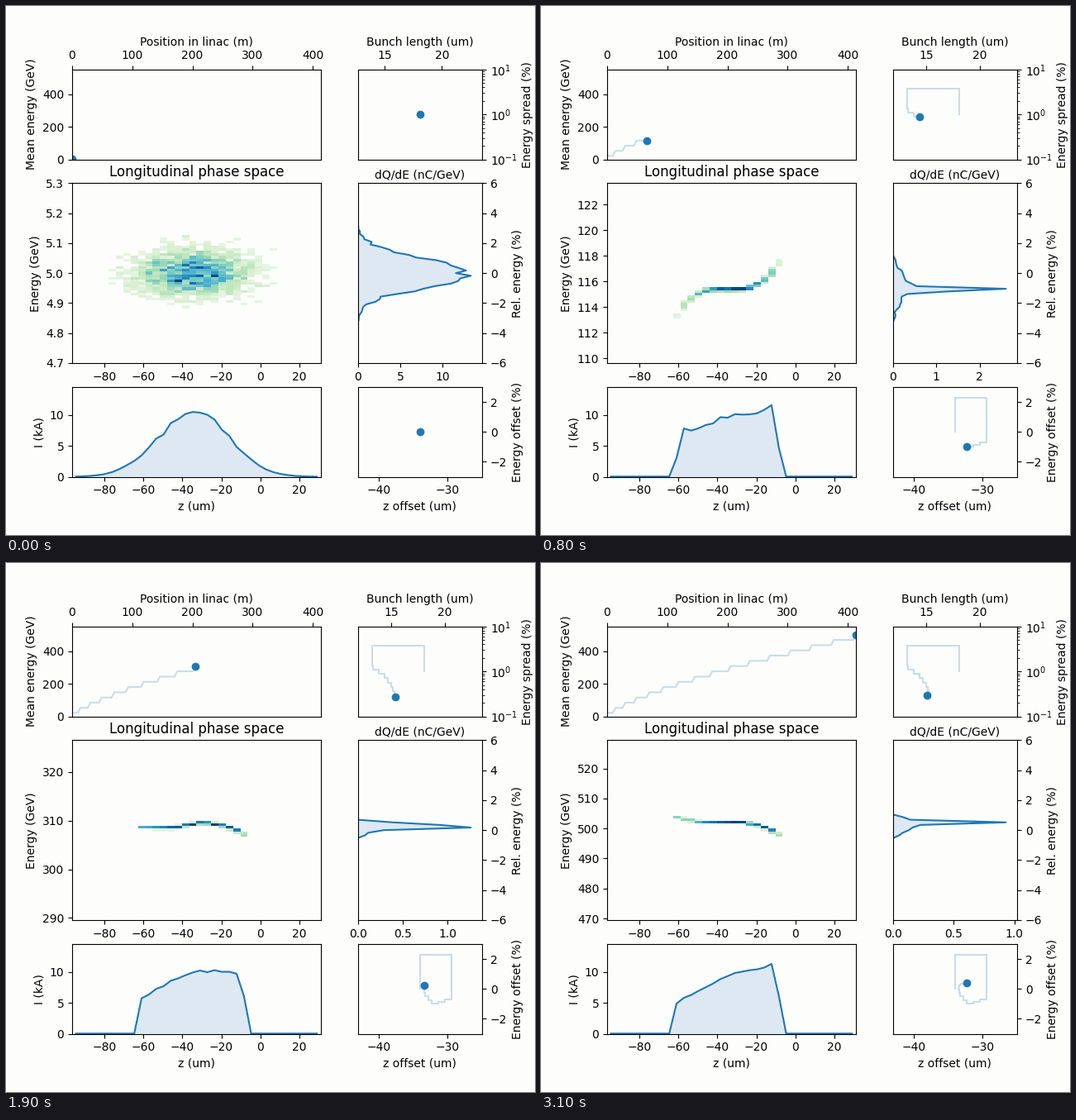
A matplotlib script that plays this animation: 640x640 px, repeating every 3200 ms.

```python
import matplotlib.pyplot as plt
import numpy as np
from matplotlib.animation import FuncAnimation

BG = "#fdfefc"
BLUE = "#1f77b4"
TRAIL = "#c9dcea"
FILL = "#dde8f2"
FRAMES = 32
COLS, ROWS = 34, 69
Z_LIM = (-96.5, 30.9)
REL_LIM = 6.0
KA_TO_NC = 0.01249      # charge of one z slice per kA
PER_KA = 30             # macro particles per kA and slice

slices = np.arange(COLS)
rel_edges = np.linspace(-REL_LIM, REL_LIM, ROWS + 1)
rel_mid = (rel_edges[1:] + rel_edges[:-1]) / 2


def z_at(c):
    return Z_LIM[0] + (c + .5) * (Z_LIM[1] - Z_LIM[0]) / COLS


# The beam alternates: odd frames accelerate (step a), even ones drift (step b).
def steps(n):
    return (n + 1) // 2, n // 2


def energy(a):
    return 5.0 if a == 0 else 20.95 + 31.9 * (a - 1)


def offset(a):
    return np.interp(a, [0, 1, 2, 4, 6, 8, 10, 12, 16],
                     [0, 2.25, -.7, -1, -.47, -.05, .22, .34, .4])


def spread(a):
    return np.exp(np.interp(a, [0, 1, 2, 4, 8, 10, 16],
                            np.log([1, 3.75, 1.36, .89, .36, .27, .3])))


def length(b):
    return np.interp(b, [0, 1, 2, 4, 6, 9, 15],
                     [18.08, 13.2, 13.33, 14.35, 15.03, 15.42, 15.1])


def z_offset(b):
    return np.interp(b, [0, 1, 4, 6, 8, 11, 15],
                     [-34, -29.4, -32.25, -33.25, -33.5, -33.1, -32.25])


def place(n):
    if n < 2:
        return 0
    k = steps(n + 1)[0] - 2 if n % 2 == 0 else steps(n)[0] - 2
    gap = 0 if n % 2 else 4.5
    return 13.9 + 15.05 * k + 1.295 * k**2 - .0235 * k**3 - gap


def horns(b):
    """Strength of the current spikes left by the first compression."""
    return np.exp((1 - b) / 2)


def current(b):
    """Current in kA for every slice."""
    noise = np.random.default_rng(b).normal(size=COLS)
    if b == 0:
        amps = 10.7 * np.exp(-.5 * ((z_at(slices) + 34.5) / 18) ** 2)
        return amps * (1 + .04 * noise)
    k, u = horns(b), (b / 15) ** 3
    knots = [8 + 2.7 * k, 9 + 3 * k, 10 + 3 * k, 16, 20, 22, 23, 24]
    level = [0, 6.3 - 1.6 * u + 8 * k, 6.7 - u + 1.8 * k, 10.2 - u - 1.8 * k,
             9.8 + .8 * u + 2.2 * k, 9.3 + 1.9 * u + 9.5 * k, 6 * (1 - k), 0]
    return np.interp(slices, knots, level) * (1 + .015 * noise) + .04


def curve(c, a, b):
    """Shape of the relative energy along the bunch, before centring."""
    if a == 0:
        return 0 * c
    if a == 1:
        return -spread(1) / length(b) * (z_at(c) - z_offset(b))
    early = 1 / (1 + np.exp((a - 6.6) / .9))
    left = np.clip((14 - c) / 5, 0, 1.2)
    right = np.clip((c - 17) / 6, 0, 1.2)
    middle = np.clip((c - 13) / 4, 0, 1)
    return ((.35 * (a / 16) ** 3 - 1.75 * early) * left**2
            + (2.7 * early - .8) * right ** (2 + 2 * horns(b))
            + .35 * np.exp(-((a - 10) / 2) ** 2) * middle)


def width(a, b):
    if a == 0:
        return np.full(COLS, .95)
    if a == 1:
        return np.full(COLS, .3 + .1 * b)
    ends = np.minimum(abs(slices - 17) / 6, 1) ** 6
    return 5 / energy(a) + .02 + .3 * horns(b) * ends


def phase_space(n):
    a, b = steps(n)
    amps, sigma = current(b), width(a, b)
    centre = offset(a)
    if a > 1:
        centre -= np.average(curve(slices, a, b), weights=amps)
    rng = np.random.default_rng(n)
    hist = np.zeros((COLS, ROWS))
    for c in slices:
        count = int(amps[c] * PER_KA)
        if count > 1:
            pos = c + rng.uniform(-.5, .5, count)
            rel = centre + curve(pos, a, b) + rng.normal(0, sigma[c], count)
            hist[c] = (np.histogram(rel, rel_edges)[0]
                       * amps[c] * KA_TO_NC / count)
    return amps, hist


fig = plt.figure(figsize=(6.4, 6.4), dpi=100, facecolor=BG)
grid = fig.add_gridspec(3, 2, width_ratios=[2, 1], height_ratios=[1, 2, 1])
(ax_pos, ax_len), (ax_ps, ax_dq), (ax_cur, ax_off) = grid.subplots()

for ax in fig.axes:
    ax.set_facecolor(BG)
for ax in (ax_pos, ax_len):
    ax.xaxis.tick_top()
for ax in (ax_pos, ax_len, ax_dq):
    ax.xaxis.set_label_position("top")
for ax in (ax_len, ax_dq, ax_off):
    ax.yaxis.tick_right()
    ax.yaxis.set_label_position("right")

image = ax_ps.imshow(np.zeros((ROWS, COLS)), cmap="GnBu", origin="lower",
                     aspect="auto", interpolation="nearest",
                     extent=(*Z_LIM, 4.7, 5.3))


def tracker(ax):
    trail, = ax.plot([], [], color=TRAIL)
    dot, = ax.plot([], [], "o", color=BLUE)
    return trail, dot


def profile(ax):
    line, = ax.plot([], [], color=BLUE)
    area, = ax.fill([0, 0, 0], [0, 0, 0], color=FILL, lw=0)
    return line, area


trackers = [tracker(ax) for ax in (ax_pos, ax_len, ax_off)]
dq_profile = profile(ax_dq)
cur_profile = profile(ax_cur)

ax_pos.set(xlim=(0, 413), ylim=(0, 552),
           xlabel="Position in linac (m)", ylabel="Mean energy (GeV)")
ax_len.set(yscale="log", ylim=(.1, 10),
           xlabel="Bunch length (um)", ylabel="Energy spread (%)")
ax_ps.set(xlim=Z_LIM, title="Longitudinal phase space",
          ylabel="Energy (GeV)")
ax_dq.set(ylim=(-REL_LIM, REL_LIM), xlabel="dQ/dE (nC/GeV)",
          ylabel="Rel. energy (%)")
ax_cur.set(xlim=Z_LIM, ylim=(0, 14.5), xlabel="z (um)", ylabel="I (kA)")
ax_off.set(xlim=(-43, -25), ylim=(-3, 3),
           xlabel="z offset (um)", ylabel="Energy offset (%)")


def state(n):
    a, b = steps(n)
    return [(place(n), energy(a) * (1 + offset(a) / 100)),
            (length(b), spread(a)),
            (z_offset(b), offset(a))]


points = np.array([state(n) for n in range(FRAMES)])


def set_profile(parts, x, y, start, end):
    line, area = parts
    line.set_data(x, y)
    area.set_xy(np.vstack([start, np.column_stack([x, y]), end]))


def draw(n):
    for k, (trail, dot) in enumerate(trackers):
        path = points[:n + 1, k]
        trail.set_data(path[:, 0], path[:, 1])
        dot.set_data(path[-1:, 0], path[-1:, 1])
    shortest = points[:n + 1, 1, 0].min()
    ax_len.set_xlim(min(.7 * length(0), .9 * shortest), 1.3 * length(0))

    amps, hist = phase_space(n)
    e0 = energy(steps(n)[0])
    low, high = e0 * .94, e0 * 1.06
    image.set_data(np.ma.masked_less(hist.T, .08 * hist.max()))
    image.set_clim(0, hist.max())
    image.set_extent((*Z_LIM, low, high))
    ax_ps.set_ylim(low, high)

    dq = hist.sum(axis=0) / ((high - low) / ROWS)
    ax_dq.set_xlim(0, 1.1 * dq.max())
    set_profile(dq_profile, dq, rel_mid, (0, rel_mid[0]), (0, rel_mid[-1]))
    z = z_at(slices)
    set_profile(cur_profile, z, amps, (z[0], 0), (z[-1], 0))


anim = FuncAnimation(fig, draw, frames=FRAMES, interval=100, repeat=True)
plt.show()
```
